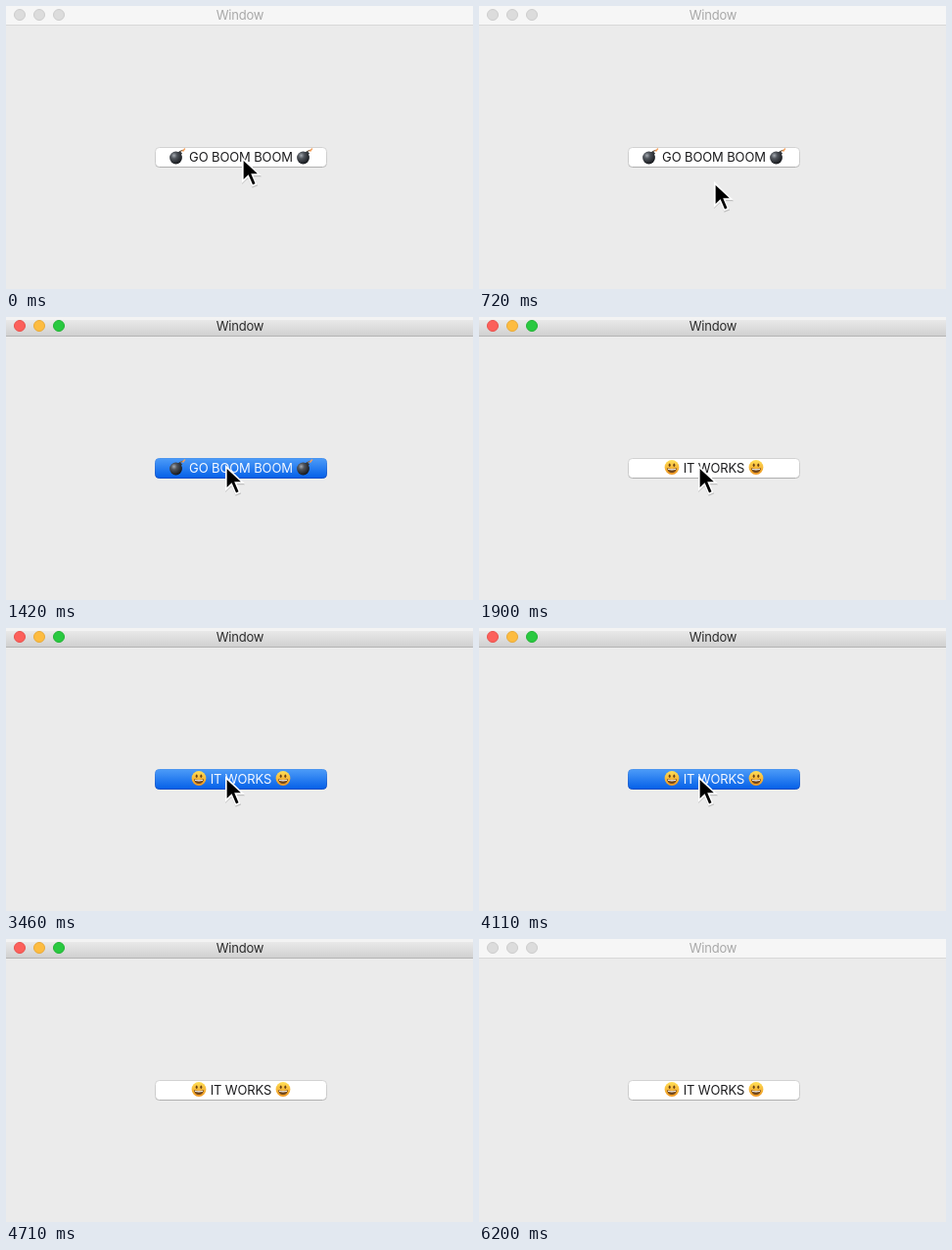
An HTML page that plays this animation: 477x289 px, repeating every 6300 ms.

```html
<!DOCTYPE html>
<html lang="en">
<head>
<meta charset="utf-8">
<title>Window</title>
<style>
  html, body { margin: 0; width: 100%; height: 100%; overflow: hidden; background: #ebebeb; }
  svg { display: block; }
  text { font: 13px Inter, "Open Sans", sans-serif; text-anchor: middle; letter-spacing: -.12px; }
  .title { letter-spacing: -.2px; }

  .active, .pressed, .before, .after, .label, .cursor { animation: 6300ms step-end infinite; }
  .active { animation-name: activate; }
  .pressed { animation-name: press; }
  .before { animation-name: leave; }
  .after { animation-name: arrive; }
  .label { animation-name: tint; }
  .cursor { animation-name: move; }

  @keyframes activate {
    0%, 98.412%, 100% { opacity: 0; }
    22.539% { opacity: 1; }
  }
  @keyframes press {
    0%, 30.158%, 56.825%, 66.19%, 100% { opacity: 0; }
    22.539%, 54.92%, 65.238% { opacity: 1; }
  }
  @keyframes tint {
    0%, 30.158%, 56.825%, 66.19%, 100% { fill: #1c1c1e; }
    22.539%, 54.92%, 65.238% { fill: #f4f8ff; }
  }
  @keyframes leave {
    0% { opacity: 1; }
    30.158%, 100% { opacity: 0; }
  }
  @keyframes arrive {
    0% { opacity: 0; }
    30.158%, 100% { opacity: 1; }
  }
  /* a dip below the button and back, later an exit to the lower right */
  @keyframes move {
    0% { transform: translate(241px, 154px); }
    8.571% { transform: translate(241px, 158px); }
    9.523% { transform: translate(241px, 168px); }
    10.634% { transform: translate(240px, 179px); }
    11.587% { transform: translate(238px, 187px); }
    12.698% { transform: translate(236px, 191px); }
    13.809% { transform: translate(234px, 188px); }
    14.761% { transform: translate(231px, 179px); }
    15.873% { transform: translate(228px, 167px); }
    16.825% { transform: translate(225px, 156px); }
    17.936% { transform: translate(224px, 151px); }
    70% { transform: translate(227px, 155px); }
    70.952% { transform: translate(240px, 170px); }
    71.904% { transform: translate(268px, 200px); }
    72.857% { transform: translate(312px, 243px); }
    73.809% { transform: translate(354px, 279px); }
    74.761%, 100% { transform: translate(400px, 330px); }
  }
</style>
</head>
<body>
<svg width="477" height="289" viewBox="0 0 477 289">
  <defs>
    <linearGradient id="bar" x2="0" y2="1">
      <stop offset="0" stop-color="#e9e9e9"/>
      <stop offset="1" stop-color="#d1d1d1"/>
    </linearGradient>
    <linearGradient id="blue" x2="0" y2="1">
      <stop offset="0" stop-color="#4c9bf8"/>
      <stop offset="1" stop-color="#0460e8"/>
    </linearGradient>
    <linearGradient id="blueEdge" x2="0" y2="1">
      <stop offset="0" stop-color="#4a94ef"/>
      <stop offset="1" stop-color="#0a4dc9"/>
    </linearGradient>
    <linearGradient id="edge" x2="0" y2="1">
      <stop offset="0" stop-color="#d2d2d2"/>
      <stop offset=".8" stop-color="#cbcbcb"/>
      <stop offset="1" stop-color="#b0b0b0"/>
    </linearGradient>
    <radialGradient id="iron" cx=".35" cy=".32" r=".7">
      <stop offset="0" stop-color="#a4a9b0"/>
      <stop offset=".35" stop-color="#50555c"/>
      <stop offset="1" stop-color="#16181c"/>
    </radialGradient>
    <linearGradient id="skin" x2="0" y2="1">
      <stop offset="0" stop-color="#ffdf55"/>
      <stop offset="1" stop-color="#ef9622"/>
    </linearGradient>

    <g id="bomb">
      <path d="M3 -4Q5 -7.5 7.5 -6.5" fill="none" stroke="#8b6b4d" stroke-width="1.2"/>
      <path d="M6.5 -5.5L8.8 -8.5" stroke="#f3a05c" stroke-width="1.4"/>
      <path d="M1 -4L3.5 -6L6 -3.5L4 -1Z" fill="#33373c"/>
      <circle cx="-.5" cy="1" r="6.4" fill="url(#iron)"/>
    </g>
    <g id="smile">
      <circle r="7.4" fill="url(#skin)"/>
      <ellipse cx="-2.3" cy="-2.2" rx="1" ry="1.8" fill="#6b4216"/>
      <ellipse cx="2.3" cy="-2.2" rx="1" ry="1.8" fill="#6b4216"/>
      <path d="M-5 .8Q0 2 5 .8Q4.5 5.6 0 5.6T-5 .8Z" fill="#70451a"/>
      <path d="M-4.2 1.3Q0 2.3 4.2 1.3L3.7 2.6Q0 3.5 -3.7 2.6Z" fill="#fff"/>
    </g>
  </defs>

  <rect width="477" height="289" fill="#ebebeb"/>

  <g>
    <rect width="477" height="19" fill="#f6f6f6"/>
    <rect y="19" width="477" height="1" fill="#d8d8d8"/>
    <g fill="#dcdcdc" stroke="#cdcdcd">
      <circle cx="14" cy="9" r="5.5"/>
      <circle cx="34" cy="9" r="5.5"/>
      <circle cx="54" cy="9" r="5.5"/>
    </g>
    <text class="title" x="239" y="14" fill="#a8a8a8">Window</text>
  </g>

  <g class="active">
    <rect width="477" height="3" fill="#f3f3f3"/>
    <rect y="3" width="477" height="16" fill="url(#bar)"/>
    <rect y="19" width="477" height="1" fill="#b4b4b4"/>
    <circle cx="14" cy="9" r="5.5" fill="#fc605b" stroke="#e9514c"/>
    <circle cx="34" cy="9" r="5.5" fill="#fdbc40" stroke="#e8aa38"/>
    <circle cx="54" cy="9" r="5.5" fill="#29c940" stroke="#22b334"/>
    <text class="title" x="239" y="14" fill="#2b2b2b">Window</text>
  </g>

  <rect x="152.5" y="144.5" width="175" height="20" rx="4" fill="#fff" stroke="url(#edge)"/>
  <rect class="pressed" x="152.5" y="144.5" width="175" height="20" rx="4" fill="url(#blue)" stroke="url(#blueEdge)"/>

  <g class="label">
    <g class="before">
      <use href="#bomb" x="174" y="154"/>
      <text x="240" y="159">GO BOOM BOOM</text>
      <use href="#bomb" x="304" y="154"/>
    </g>
    <g class="after">
      <use href="#smile" x="197" y="153.5"/>
      <text x="240" y="159">IT WORKS</text>
      <use href="#smile" x="283" y="153.5"/>
    </g>
  </g>

  <g class="cursor">
    <g transform="scale(1.65)">
      <path d="M0 .6V17L3.8 13.4L6.4 19.3L9.8 17.9L7.3 12.2H12.2Z" fill="#000" opacity=".18"/>
      <path d="M0 0V16.3L3.7 12.7L6.2 18.5L9.5 17.1L7.1 11.5H12Z" fill="#fff"/>
      <path d="M1 2.4V13.9L4 11L6.7 17.2L8.2 16.5L5.6 10.5H9.6Z" fill="#000"/>
    </g>
  </g>
</svg>
</body>
</html>
```
